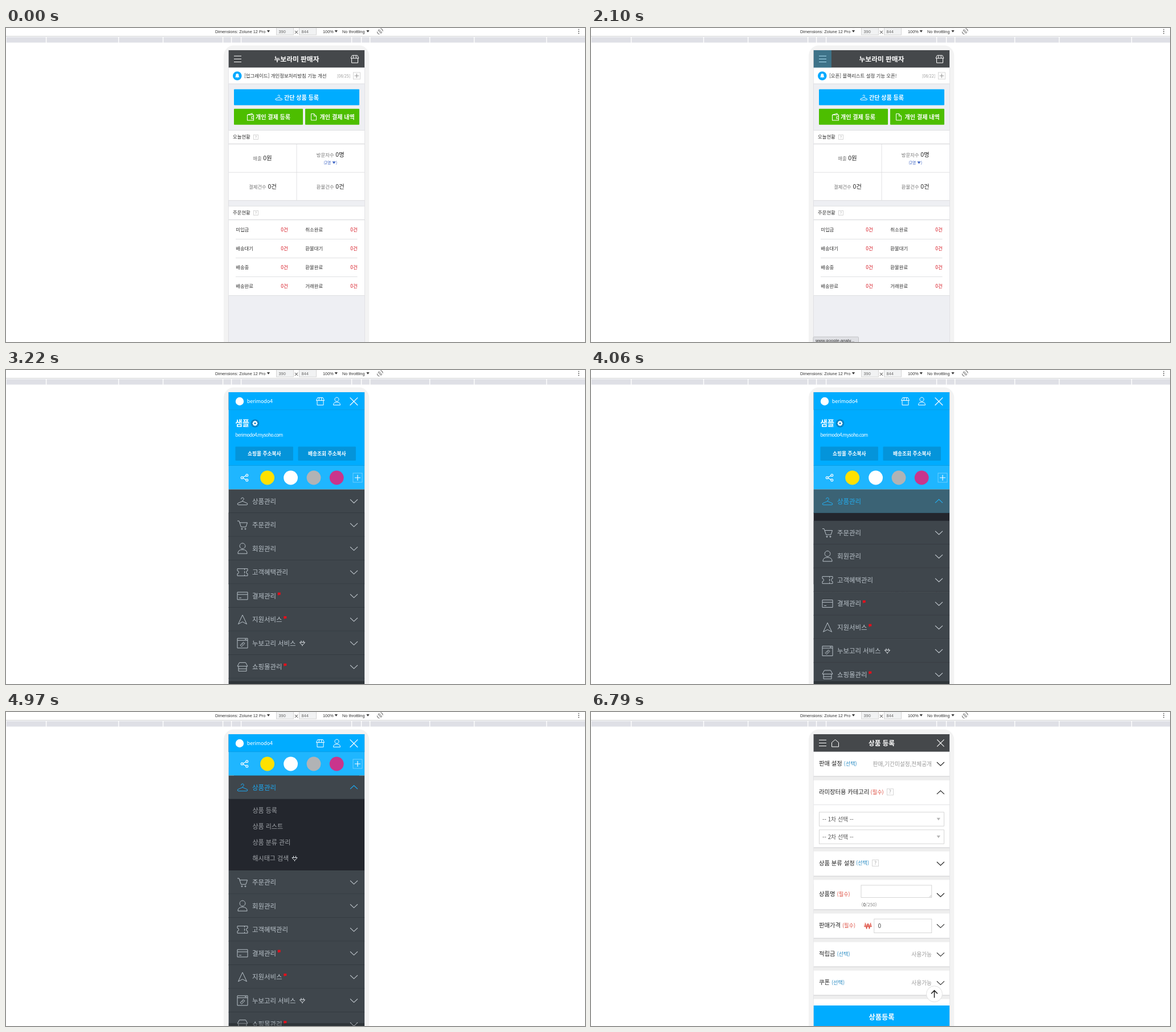
Recreate the animation shown at these times as an HTML page. Size 1016 px wide and 551 px high, loop 8000 ms.

```html
<!DOCTYPE html>
<html lang="ko">
<head>
<meta charset="utf-8">
<title>판매자 화면</title>
<style>
html, body { margin: 0; width: 100%; height: 100%; overflow: hidden; background: #fff; }
svg { display: block; width: 100vw; height: 100vh; }
text { font-family: "Noto Sans CJK KR", "Noto Sans CJK", "Noto Sans", sans-serif; white-space: pre; }
.ui { font-family: "Liberation Sans", Arial, sans-serif; }
</style>
</head>
<body>
<svg id="stage" viewBox="0 0 1016 551" preserveAspectRatio="none"></svg>
<script>
const LOOP = 8000, STEP = 70;
const BLUE = '#00acff', DARK = '#45484b', LINE = '#d9dadc', TAP = 'rgb(51,181,229)';
const LEFT = 390.5, RIGHT = 629.2, WIDTH = RIGHT - LEFT;

// Drawing helpers; text y is the visual centre of the line.
const rect = (x, y, w, h, fill, extra = '') =>
  `<rect x="${x}" y="${y}" width="${w}" height="${h}" fill="${fill}" ${extra}/>`;
const box = (x, y, w, h, stroke, fill = '#fff') =>
  rect(x, y, w, h, fill, `stroke="${stroke}" stroke-width=".8"`);
const band = (y1, y2, fill) => rect(LEFT, y1, WIDTH, y2 - y1, fill);
const path = (d, stroke = '#fff', w = 1, fill = 'none') =>
  `<path d="${d}" stroke="${stroke}" stroke-width="${w}" fill="${fill}"/>`;
const disc = (x, y, r, fill, extra = '') => `<circle cx="${x}" cy="${y}" r="${r}" fill="${fill}" ${extra}/>`;
const text = (x, y, size, fill, str, extra = '') =>
  `<text x="${x}" y="${y + size * .37}" font-size="${size}" fill="${fill}" ${extra}>${str}</text>`;
const bold = 'font-weight="700"', mid = 'text-anchor="middle"', end = 'text-anchor="end"';
const at = (x, y, inner, scale = 1) => `<g transform="translate(${x} ${y}) scale(${scale})">${inner}</g>`;
const group = (id, inner) => `<g id="${id}">${inner}</g>`;
const chevron = (x, y, color, up) =>
  at(x, y, path(up ? 'M-6.5 3L0-3.2 6.5 3' : 'M-6.5-3L0 3.2 6.5-3', color, 1.1));
const arrowDown = (x, y, color, r = 2.6) => path(`M${x - r} ${y - r * .65}h${2 * r}l${-r} ${r * 1.4}z`, 'none', 0, color);
const help = (x, y, s) => box(x, y, s, s, '#ccc') + text(x + s / 2, y + s / 2, s * .78, '#999', '?', mid);

const shape = {
  hanger: 'M-2.3-3.8A2.3 2.3 0 1 1 1-2Q0-1.6 0-.2L8.5 3.6Q9.6 6.3 7 6.3H-7Q-9.6 6.3-8.5 3.6L0-.2',
  store: 'M-4.6-6.5H4.6L7-1.5H-7ZM-5.5-1.5V6.5H5.5V-1.5M-2-6.5L-2.5-1.5M2-6.5L2.5-1.5',
  person: 'M0-7A3.6 3.6 0 1 1-.01-7M-6 6.5Q-6 1.3 0 1.3T6 6.5Z',
  cart: 'M-9-7H-6L-2.5 3.5H6L8.5-4H-5M-1 6a1 1 0 1 1-.01 0M5 6a1 1 0 1 1-.01 0',
  ticket: 'M-9-6.2H9V-2.5a2.5 2.5 0 0 0 0 5V6.2H-9V2.5a2.5 2.5 0 0 0 0-5ZM3.5-6v2m0 2v4m0 2v2',
  card: 'M-9-6.5H9V6.5H-9ZM-9-2.5H9M-6 3.5h4',
  pointer: 'M0-8L7.5 8 0 4-7.5 8Z',
  page: 'M-9-8.5H9V8.5H-9ZM-9-5H9M-4 3.5l5.5-5.5 2.5 2.5-5.5 5.5zM-1.5 3l3-3M4-6.8h3',
  shop: 'M-5.5-7.5H5.5L9-1H-9ZM-7-1V7.5H7V-1M-7 3.5H7',
  plug: 'M-4.5-1.5H4.5Q3.5 1 0 3.2-3.5 1-4.5-1.5M-2-4.5V-1.5M2-4.5V-1.5M0 3V5',
  cross: 'M-6.8-6.8L6.8 6.8M6.8-6.8L-6.8 6.8',
  bars: 'M-6.5-5.2H6.5M-6.5 0H6.5M-6.5 5.2H6.5',
  plus: 'M-1 0H1M0-1V1'
};
const icon = (name, x, y, color = '#fff', scale = 1, w = 1) => at(x, y, path(shape[name], color, w / scale), scale);

function toolbar() {
  const label = (x, str, fill = '#333') => text(x, 6, 7.33, fill, str, 'class="ui"');
  const gaps = [0, 70.5, 197.5, 275.5, 380.5, 395.5, 412.5, 606.5, 623.5, 638.5, 743.5, 821.5, 948.5];
  return rect(0, 14, 1016, .9, '#c9cacc') + rect(0, 16, 1016, 9.6, '#dfe0e6') +
    gaps.map(x => rect(x - .6, 15, 1.4, 11, '#fff')).join('') +
    label(367, 'Dimensions: Zolune 12 Pro') + arrowDown(460.5, 5.8, '#333') +
    box(474.5, -2, 30, 14, '#ccc', '#f1f2f3') + label(478.5, '390', '#666') +
    path('M507 4.8l5 5m0-5l-5 5', '#333', 1) +
    box(514.5, -2, 30, 14, '#ccc', '#f1f2f3') + label(518.5, '844', '#666') +
    label(556, '100%') + arrowDown(579.3, 5.8, '#333') +
    label(590, 'No throttling') + arrowDown(635, 5.8, '#333') +
    at(656.3, 6, path('M-1.8-3.2L3.2 1.8 1.8 3.2-3.2-1.8ZM1-5Q5-4.5 5-.5M-1 5Q-5 4.5-5 .5', '#555', 1)) +
    [2.6, 6, 9.4].map(y => disc(1005, y, .9, '#555')).join('');
}

function notice(y, title, date) {
  return text(418, y, 8.43, '#333', title) + text(604, y, 7, '#999', date, end);
}

function homePage() {
  const section = (y, title) => band(y, y + 24, '#fff') + band(y, y + .8, LINE) + band(y + 23.6, y + 25, LINE) +
    text(398, y + 12, 8.4, '#333', title) + help(434.4, y + 8.2, 8);
  const stat = (x, y, name, value) => text(x, y + .4, 8.4, '#777', name) +
    text(x + name.length * 7.75 + 2.4, y, 10.5, '#222', value);
  const orders = ['미입금', '취소완료', '배송대기', '환불대기', '배송중', '환불완료', '배송완료', '거래완료'];
  return band(39, 551, '#eeeff3') + band(39, 69.6, DARK) +
    icon('bars', 406.5, 54.4) + text(510, 55, 11.75, '#fff', '누보라미 판매자', `${bold} ${mid}`) +
    icon('store', 612, 54.6) +
    band(69.6, 97.6, '#fff') + band(97.6, 98.4, LINE) +
    `<g clip-path="url(#news)">${group('ticker',
      notice(84, '[업그레이드] 개인정보처리방침 기능 개선', '[08/25]') +
      notice(111, '[오픈] 블랙리스트 설정 기능 오픈!', '[08/22]'))}</g>` +
    disc(405.8, 84, 7.8, '#00a9ff') +
    path('M402 86.6Q403.2 85.5 403.2 83.2 403.2 80 405.8 80T408.4 83.2Q408.4 85.5 409.6 86.6ZM404.8 87.3h2L405.8 88.3Z', 'none', 0, '#fff') +
    box(609.6, 78, 11.8, 11.8, '#ccc') + icon('plus', 615.5, 83.9, '#888', 3.8, .9) +
    rect(400, 107.6, 220, 28, BLUE, 'rx="1"') + icon('hanger', 478.7, 122, '#fff', .68) +
    text(488, 122, 10.05, '#fff', '간단 상품 등록', bold) +
    rect(400, 141.8, 121, 28, '#4dbe00', 'rx="1"') + rect(525, 141.8, 95, 28, '#4dbe00', 'rx="1"') +
    path('M423.5 152.5h11v9.5h-11zM424 152.3L432 150v2.3M434.5 155.5h-3.5v3.5h3.5', '#fff', 1.1) +
    text(438, 156, 10.05, '#fff', '개인 결제 등록', bold) +
    path('M535.5 150.5h5l4 4v7.3h-9zM540.5 150.5v4h4', '#fff', 1) +
    text(550.6, 156, 10.05, '#fff', '개인 결제 내역', bold) +
    section(179.2, '오늘현황') + band(204.2, 302.5, '#fff') + band(252.8, 253.6, LINE) +
    rect(509.6, 204, .8, 98.5, LINE) + band(302.3, 303.2, LINE) +
    stat(433.3, 228.5, '매출', '0원') + stat(544.8, 222.4, '방문자수', '0명') +
    text(557.4, 236, 7, '#3c63c4', '(2명') + arrowDown(575.5, 236.2, '#3c63c4', 3) + text(578.7, 236, 7, '#3c63c4', ')') +
    stat(426, 278, '결제건수', '0건') + stat(544.8, 278, '환불건수', '0건') +
    section(312.3, '주문현황') + band(337.2, 469.4, '#fff') + band(469.2, 470, LINE) +
    orders.map((name, i) => {
      const y = 354 + 33 * (i >> 1), odd = i % 2;
      return text(odd ? 525.3 : 403.2, y, 8.4, '#333', name) +
        text(odd ? 616.8 : 494.8, y, 8.45, '#d5101c', '0건', end) +
        (odd && i < 7 ? rect(403, y + 16.1, 213.5, .8, LINE) : '');
    }).join('') +
    group('tapMenu', rect(LEFT, 39, 31.4, 30.6, TAP));
}

const menu = [
  ['상품관리', 'hanger'], ['주문관리', 'cart'], ['회원관리', 'person', 1.35], ['고객혜택관리', 'ticket'],
  ['결제관리', 'card', 1, 'new'], ['지원서비스', 'pointer', 1, 'new'],
  ['누보고리 서비스', 'page', 1, 'plug'], ['쇼핑몰관리', 'shop', 1, 'new'], ['', '']
];
const ROW = 41.5, MENU_TOP = 209.5, SUB = 125;

function menuRow([name, symbol, scale = 1, mark], i) {
  const top = MENU_TOP + ROW * i, y = top + 20.9;
  const stop = 432 + name.length * 10.5;
  const badge = mark === 'new'
    ? path(`M${stop + 2.8} ${y - 5.8}h5v4h-2.5l-1.6 1.4v-1.4h-.9z`, 'none', 0, '#e3101c')
    : mark === 'plug' ? icon('plug', 520, y, '#dde2e6') : '';
  return band(top, top + ROW + .5, '#3f464c') + band(top + ROW - .9, top + ROW, '#343a40') +
    (name ? icon(symbol, 415, y, 'currentColor', scale) +
      text(432, y, 11.4, 'currentColor', name, 'font-weight="500"') + badge : '') +
    (i && name ? chevron(610.5, y, '#c3cad0') : '');
}

function menuPage() {
  const copyButton = (x, label) => rect(x, 134.6, 101.4, 24.4, '#0494da', 'rx="1"') +
    text(x + 50.7, 147, 8.7, '#fff', label, `${bold} ${mid}`);
  const items = ['상품 등록', '상품 리스트', '상품 분류 관리', '해시태그 검색'];
  const gear = [0, 45, 90, 135].map(a => rect(-1, -4.6, 2, 9.2, '#fff', `transform="rotate(${a})"`)).join('') +
    disc(0, 0, 3.4, '#fff') + disc(0, 0, 1.5, '#0480c4');
  const content = band(70, 168, BLUE) +
    text(402.6, 93, 13.3, '#fff', '샘플', bold) + disc(437, 93.6, 7.2, '#0480c4') + at(437, 93.6, gear) +
    text(402.6, 113.5, 8.3, '#fff', 'berimodo4.mysoho.com', 'letter-spacing="-.6"') +
    copyButton(402.5, '쇼핑몰 주소복사') + copyButton(512.5, '배송조회 주소복사') +
    band(167.2, 168, '#0a9be2') + band(168, MENU_TOP, '#1fb6ff') +
    path('M422.6 184.8L414.4 189 422.6 193.2', '#fff', 1.2) +
    [[422.8, 184.8], [414.2, 189], [422.8, 193.2]].map(([x, y]) => disc(x, y, 1.9, '#1fb6ff', 'stroke="#fff" stroke-width="1.2"')).join('') +
    disc(458.6, 189, 12.4, '#ffe100') + disc(499.6, 189, 12.4, '#fff') +
    disc(540, 189, 12.4, '#b1b3b5') + disc(580.2, 189, 12.4, '#c9358c') +
    box(609, 181, 16, 16, '#7fd4ff', 'none') + icon('plus', 617, 189, '#fff', 5, 1.1) +
    group('first', menuRow(menu[0], 0)) +
    group('closed', chevron(610.5, 230.2, '#c3cad0')) + group('opened', chevron(610.5, 230.2, '#1cabf5', true)) +
    group('tapRow', band(MENU_TOP, MENU_TOP + ROW, TAP)) +
    band(251, 376, '#23262d') +
    items.map((name, i) => text(432.4, 270.8 + 28.1 * i, 11, '#a0a4a9', name)).join('') +
    icon('plug', 506.5, 355, '#dde2e6') +
    group('tapItem', rect(432, 257, RIGHT - 432, 28, TAP)) +
    group('rest', menu.slice(1).map((row, i) => menuRow(row, i + 1)).join('') + band(582, 700, '#3f464c'));
  return group('scroller', `<g color="#b9c2c9">${content}</g>`) +
    band(546, 551, 'rgba(0,0,0,.25)') +
    band(39, 70, BLUE) + band(69.4, 70.2, '#0a9be2') +
    disc(410, 55, 7.2, '#fff') + text(422.8, 54.8, 9, '#fff', 'berimodo4', 'letter-spacing="-.15"') +
    icon('store', 551.5, 55) + icon('person', 580.5, 55) + icon('cross', 610.4, 55.2, '#fff', 1, 1.2);
}

function formPage() {
  const NEED = '#dd4b3e', PICK = '#2a8cc4';
  const card = (y1, y2) => band(y1, y2, '#fff') + band(y2, y2 + 1, '#cfd0d2');
  const title = (y, name, x, needed) => text(400, y, 10.3, '#222', name) +
    text(x, y, 9.2, needed ? NEED : PICK, needed ? '(필수)' : '(선택)');
  const note = (y, str) => text(598, y, 9.7, '#999', str, end);
  const select = (y, str) => box(400.4, y, 219, 24.4, '#ccc') + text(406, y + 12.2, 9.9, '#555', str) +
    arrowDown(609.8, y + 12, '#b5b5b5', 3.2);
  const ends = [[70, 112.4], [120, 237.6], [244.6, 287.6], [294.6, 346.4], [353.6, 396.6], [403.8, 446.6], [453.8, 496.6], [503.8, 520]];
  return band(39, 551, '#eee') + band(39, 69.6, DARK) +
    icon('bars', 406.5, 54.4) + path('M422.5 53.5L428.5 48.5 434.5 53.5V61H422.5Z') +
    text(510, 55, 11.6, '#fff', '상품 등록', `${bold} ${mid}`) + icon('cross', 613.4, 54.4, '#fff', .9, 1.1) +
    ends.map(([a, b]) => card(a, b)).join('') +
    [91, 266, 321, 375.4, 425.4, 475.4].map(y => chevron(613.4, y, '#222')).join('') + chevron(613.4, 141.2, '#222', true) +
    title(90.4, '판매 설정', 443.6) + note(91, '판매,기간미설정,전체공개') +
    title(140.4, '라미장터용 카테고리', 490.6, true) + help(519.4, 134.8, 11) + band(162.4, 163.2, LINE) +
    select(175.8, '-- 1차 선택 --') + select(206.8, '-- 2차 선택 --') +
    title(265, '상품 분류 설정', 465) + help(493.6, 259.6, 11) +
    title(319.4, '상품명', 431.6, true) + box(474, 304, 123.8, 21.4, '#ccc') +
    path('M594 324.5l3-3M596 324.5l1-1', '#888', .6) +
    text(474.6, 337.5, 8.2, '#888', '(<tspan fill="#333">0</tspan>/250)') +
    title(374.5, '판매가격', 441, true) +
    path('M481 370L483.6 380.5 486 371 488.4 380.5 491 370M479 374h14M479 376.4h14', NEED, 1.1) +
    box(496.8, 363.2, 101, 24.4, '#ccc') + text(503.4, 375.6, 10, '#444', '0') +
    title(424.5, '적립금', 431.4) + note(425, '사용가능') +
    title(474.6, '쿠폰', 422) + note(475, '사용가능') +
    band(515, 551, BLUE) + text(510, 535, 12.2, '#fff', '상품등록', `${bold} ${mid}`) +
    group('toTop', disc(602.5, 494.8, 14, '#fff', 'stroke="#ddd" stroke-width=".9"') +
      path('M602.5 501.5V488.8M597 494.2L602.5 488.6 608 494.2', '#222', 1.5));
}

document.getElementById('stage').innerHTML = `
  <clipPath id="screen">${rect(LEFT, 39, WIDTH, 512, '#000')}</clipPath>
  <clipPath id="news">${rect(LEFT, 70.4, WIDTH, 26.6, '#000')}</clipPath>` +
  toolbar() + rect(382, 30.4, 255.2, 560, '#f3f3f3', 'rx="18"') +
  rect(LEFT - .6, 38.6, WIDTH + 1.2, 520, '#dcdde0') +
  `<g clip-path="url(#screen)">${group('home', homePage()) + group('menu', menuPage()) + group('form', formPage())}</g>` +
  group('status', rect(390, 542, 79.5, 14, '#dfe0e4', 'stroke="#b9babd" stroke-width=".8" rx="1.5"') +
    text(394, 548.2, 7.7, '#333', 'www.google-analy...', 'class="ui"'));

const el = {};
document.querySelectorAll('g[id]').forEach(node => el[node.id] = node);
const clamp = v => Math.min(1, Math.max(0, v));
const swing = (t, from, length) => .5 - Math.cos(Math.PI * clamp((t - from) / length)) / 2;
const tap = (t, from) => t < from ? 0 : .4 * clamp(1 - (t - from) / 210);
const show = (node, on) => node.style.display = on ? '' : 'none';
const move = (node, x, y) => node.setAttribute('transform', `translate(${x} ${y})`);

function render(t) {
  const open = t >= 3990;
  move(el.ticker, 0, -27 * swing(t, 1290, 310));
  el.tapMenu.style.opacity = tap(t, 2100);
  show(el.menu, t > 2170 && t < 6510);
  move(el.menu, -WIDTH * (1 - swing(t, 2170, 540)), 0);
  el.status.style.opacity = t < 2100 ? 0 : clamp(1 - (t - 3010) / 210);
  el.first.style.color = open ? '#1cabf5' : '';
  show(el.opened, open);
  show(el.closed, !open);
  el.tapRow.style.opacity = tap(t, 3990);
  move(el.rest, 0, SUB * swing(t, 3970, 420));
  move(el.scroller, 0, -98 * swing(t, 4650, 310));
  el.tapItem.style.opacity = tap(t, 6090);
  show(el.form, t >= 6510);
  el.toTop.style.opacity = clamp((t - 6510) / 280);
}

const start = performance.now();
(function frame() {
  const t = (performance.now() - start) % LOOP;
  render(Math.floor(t / STEP) * STEP);
  requestAnimationFrame(frame);
})();
</script>
</body>
</html>
```
